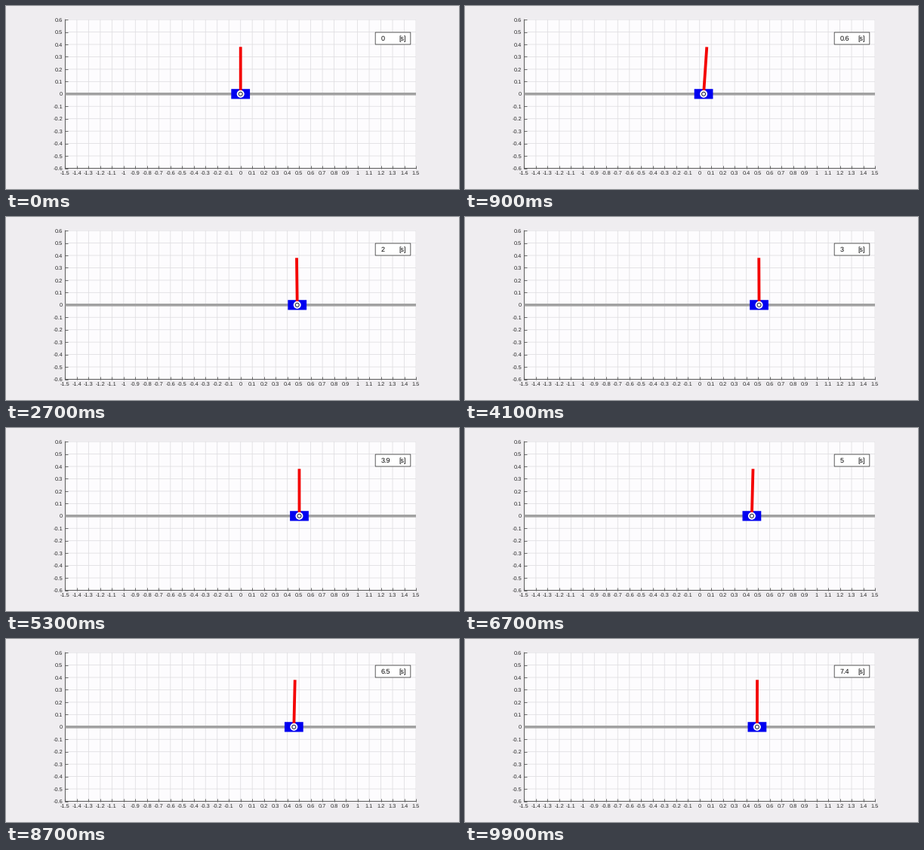
Animation of 600 by 243 pixels, one loop 10000 ms. Source, as a matplotlib script:

```python
import numpy as np
import matplotlib.pyplot as plt
from matplotlib.animation import FuncAnimation
from matplotlib.patches import Ellipse, Rectangle

W, H = 600, 243
FRAMES, INTERVAL = 100, 100
LEFT, RIGHT, TOP, BOTTOM = 78.4, 543, 18.1, 215.5
POLE = 0.38
HALF_W, HALF_H = 0.08, 0.04
GOAL = 0.5
PUSHES = [(34, -0.1), (53.3, 1), (77.7, 0.5)]  # (frame, strength)
INK, LINE = "#262626", "#4c4c4c"

plt.rcParams.update({"font.family": "Liberation Sans", "text.hinting": "none"})


def step(k):
    """Fourth-order step to the goal; the cart dips back to tip the pole."""
    t = 0.35 * (k - 4 * (1 - np.exp(-k / 4)))
    rise = 1 - np.exp(-t) * (1 + t + t**2 / 2 + t**3 / 6)
    accel = np.exp(-t) * (3 * t**2 - t**3) / 6
    return GOAL * (rise - 0.56 * accel), 0.72 * accel


def push(k):
    """Cart offset and pole lean k frames after a push to the left."""
    if k <= 0:
        return 0, 0
    u, q = k / 6.8, k / 4.4
    return (-0.094 * (u * np.exp(1 - u)) ** 1.8,
            0.55 * q * (q - 1) * np.exp(-1.57 * q))


def pose(k):
    x, lean = step(k)
    for start, strength in PUSHES:
        dx, da = push(k - start)
        x += strength * dx
        lean += strength * da
    return x, lean


def clock(k):
    return f"{(3 * k // 4) / 10:g}"


# 72 dpi makes one point equal one pixel
fig = plt.figure(figsize=(W / 72, H / 72), dpi=72, facecolor="#efedf0")
ax = fig.add_axes([LEFT / W, 1 - BOTTOM / H,
                   (RIGHT - LEFT) / W, (BOTTOM - TOP) / H],
                  facecolor="#fdfcfe")
ax.set(xlim=(-1.5, 1.5), ylim=(-0.6, 0.6))
PX, PY = 3 / (RIGHT - LEFT), 1.2 / (BOTTOM - TOP)  # data units per pixel

xt = np.arange(-15, 16) / 10
yt = np.arange(-6, 7) / 10
ax.set_xticks(xt, [f"{v:g}" for v in xt])
ax.set_yticks(yt, [f"{v:g}" for v in yt])
ax.tick_params(direction="in", length=4, width=0.8, color=LINE,
               labelcolor=INK, labelsize=7.4, pad=3.5)
ax.grid(color="#dfdee1", lw=0.8)
ax.set_axisbelow(True)
for side in ("top", "right"):
    ax.spines[side].set_visible(False)
for side in ("left", "bottom"):
    ax.spines[side].set(color=LINE, linewidth=0.9)


def disc(d, **style):
    return ax.add_patch(Ellipse((0, 0), d * PX, d * PY, **style))


ax.plot([-1.5, 1.5], [0, 0], color="#a2a2a2", lw=3.6,
        solid_capstyle="butt", zorder=3)
cart = ax.add_patch(Rectangle((-HALF_W, -HALF_H), 2 * HALF_W, 2 * HALF_H,
                              fc="#0000f0", ec="none", zorder=4))
pole, = ax.plot([], [], color="#f40000", lw=3.8, solid_capstyle="butt",
                zorder=5)
hub = disc(10, fc="white", ec="none", zorder=6)
pin = disc(5, fc="white", ec="#30304c", lw=1.1, zorder=7)

# Clock box, placed in pixels from the top left corner
fig.add_artist(Rectangle((489.2 / W, 1 - 51 / H), 46.6 / W, 16 / H,
                         fc="white", ec=LINE, lw=0.9))


def label(x, s):
    return fig.text(x / W, 1 - 46.4 / H, s, size=9, color="black",
                    va="baseline", ha="left")


seconds = label(496.3, "0")
label(520, "[s]")

# Keep lines and shapes at their exact fractional positions
for artist in fig.findobj():
    artist.set_snap(False)


def draw(k):
    x, a = pose(k)
    cart.set_x(x - HALF_W)
    pole.set_data([x, x + POLE * np.sin(a)], [0, POLE * np.cos(a)])
    hub.set_center((x, 0))
    pin.set_center((x, 0))
    seconds.set_text(clock(k))
    return cart, pole, hub, pin, seconds


anim = FuncAnimation(fig, draw, frames=FRAMES, interval=INTERVAL, repeat=True)
plt.show()
```
